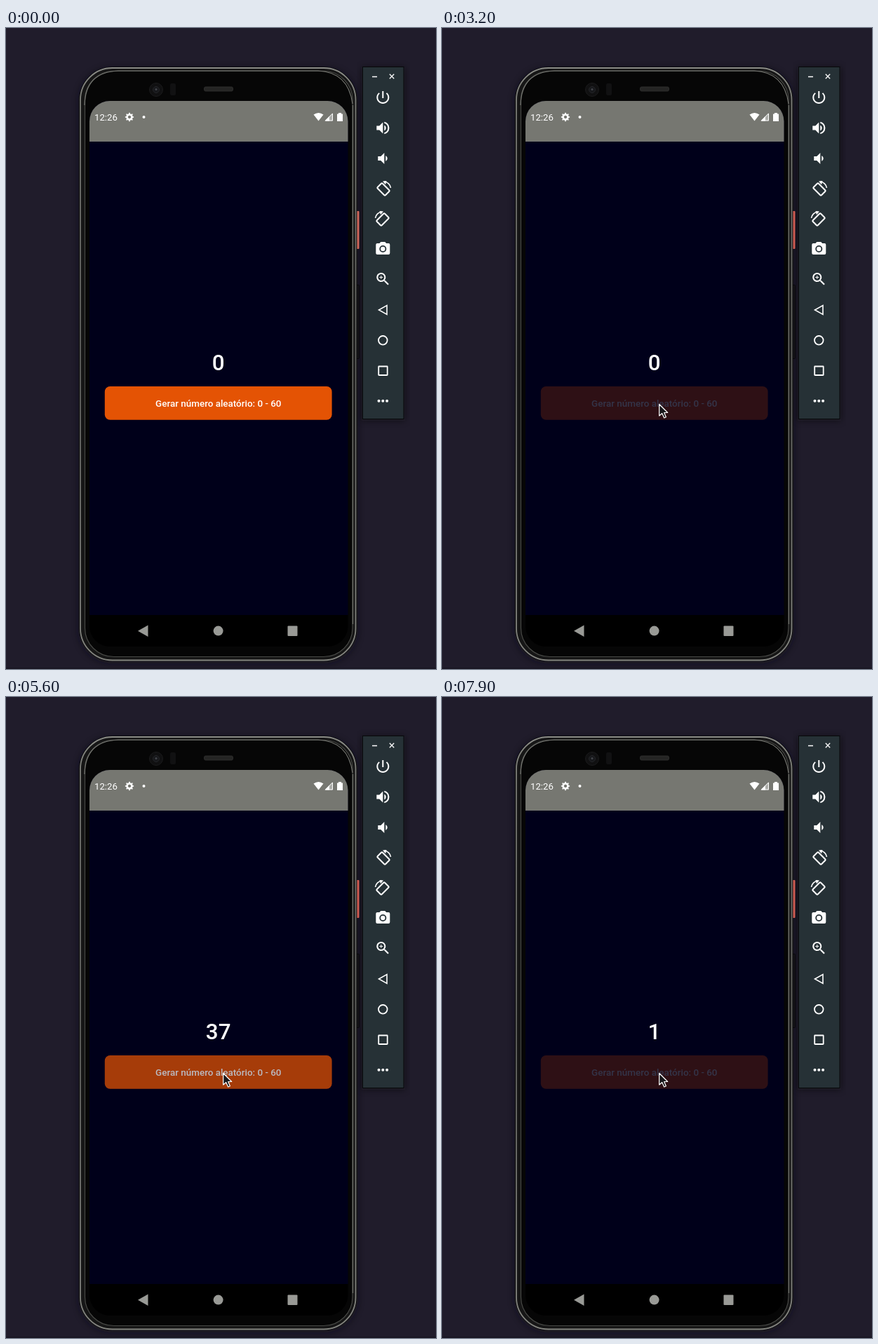
Recreate the animation shown at these times as an HTML page. Size 613 by 914 pixels, loop 8 s.

```html
<!DOCTYPE html>
<html lang="pt">
<head>
<meta charset="utf-8">
<title>Número aleatório</title>
<style>
  html, body { margin: 0; width: 100%; height: 100%; overflow: hidden; background: #201c2b; }
  svg { display: block; width: 613px; height: 914px; }
  text { font-family: Roboto, sans-serif; fill: #fff; }
  .mid { text-anchor: middle; font-weight: 500; }
  .line { fill: none; stroke: #fff; stroke-width: 1.8; }
</style>
</head>
<body>
<svg viewBox="0 0 613 914">
  <defs>
    <linearGradient id="rim" x1="0" y1="0" x2="0" y2="1">
      <stop offset="0" stop-color="#8b8c88"/>
      <stop offset=".08" stop-color="#777873"/>
      <stop offset=".5" stop-color="#5f605d"/>
      <stop offset="1" stop-color="#858681"/>
    </linearGradient>
    <filter id="soft" x="-10%" y="-10%" width="120%" height="120%"><feGaussianBlur stdDeviation="5"/></filter>
    <clipPath id="screen"><rect x="119" y="104" width="368.5" height="778" rx="29"/></clipPath>
    <g id="rotate">
      <rect x="-5" y="-8" width="10" height="16" rx="1.3" transform="translate(0 1) rotate(-45)" class="line" style="stroke-width:2"/>
      <path d="M1 -10A10.5 10.5 0 0 1 10.5 -1" class="line" style="stroke-width:1.6"/>
      <path d="M-1 -10.5L4.5 -11L3 -5.8Z" fill="#fff"/>
    </g>
  </defs>
  <rect width="613" height="914" fill="#201c2b"/>
  <rect y="912" width="613" height="2" fill="#191623"/>

  <!-- phone body -->
  <rect x="103" y="57" width="399" height="849" rx="48" fill="#0d0b13" opacity=".55" filter="url(#soft)"/>
  <rect x="499" y="366.500" width="4.500" height="105" rx="1" fill="#17161b" stroke="#0a090d"/>
  <rect id="power" x="499.500" y="261" width="4" height="54" rx="1" fill="#df7063"/>
  <rect x="104.500" y="55.500" width="395.500" height="847" rx="47" fill="#121212" stroke="#0b0b0c"/>
  <rect x="106" y="57" width="392.500" height="844.500" rx="45.500" fill="#161616" stroke="url(#rim)" stroke-width="1.800"/>
  <rect x="112.500" y="61.500" width="381.500" height="835" rx="41" fill="#060606" stroke="#484946" stroke-width="1.200"/>
  <path d="M112 110Q113 63 160 61H445Q488 63 494 108" fill="none" stroke="#777873" stroke-width="1.200"/>
  <path d="M494.500 110V850" stroke="#6c6d69" stroke-width="1.300"/>
  <circle cx="214" cy="88" r="9.500" fill="#101011" stroke="#1b1b1c"/>
  <circle cx="214" cy="88" r="4.500" fill="#17181b" stroke="#242528"/>
  <circle cx="214" cy="87.500" r="1.500" fill="#42454b"/>
  <rect x="234" y="79" width="8" height="17" rx="2" fill="#111112"/>
  <rect x="282.500" y="84" width="41" height="6" rx="2" fill="#252524" stroke="#333331" stroke-width=".8"/>

  <!-- screen -->
  <g clip-path="url(#screen)">
    <rect x="119" y="104" width="369" height="733" fill="#00001a"/>
    <rect x="119" y="104" width="369" height="58" fill="#767771"/>
    <rect x="119" y="837" width="369" height="46" fill="#000"/>
  </g>
  <text x="126" y="132" font-size="13.2">12:26</text>
  <path id="gear" fill="#fff"/>
  <g fill="#fff">
    <circle cx="196.500" cy="127" r="2"/>
    <path d="M438.500 123.500Q445.500 118.500 452.500 123.500L445.500 132.500Z"/>
    <path d="M454.500 132.500L466 121V132.500Z" opacity=".4"/>
    <path d="M454.500 132.500L461 126V132.500Z"/>
    <path d="M465.500 122V132H455.500Z" fill="none" stroke="#fff"/>
    <path d="M472 122.500H474V121H478V122.500H480V133H472Z"/>
  </g>
  <g fill="#999a96">
    <path d="M188 859.800L202.500 851.500V868Z"/>
    <circle cx="302.600" cy="859.600" r="7"/>
    <rect x="401.500" y="852.500" width="14" height="14.500" rx="1"/>
  </g>

  <text id="number" class="mid" x="302.700" y="488" font-size="31.4">0</text>
  <g id="button">
    <rect x="140.800" y="511" width="323.800" height="47.800" rx="7.500" fill="#e45304"/>
    <text class="mid" x="302.800" y="540.300" font-size="13.45">Gerar número aleatório: 0 - 60</text>
  </g>

  <!-- side toolbar -->
  <rect x="507" y="56" width="62" height="504" fill="#0b0910" opacity=".5" filter="url(#soft)"/>
  <rect x="508.500" y="55.500" width="58.500" height="502" fill="#263136" stroke="#07090a"/>
  <path d="M522 69.500H529M546.800 65.800L553.200 72.200M553.200 65.800L546.800 72.200" class="line" style="stroke-width:1.3"/>
  <g id="icons" fill="#fff"></g>
  <use href="#rotate" x="538" y="229"/>
  <use href="#rotate" transform="translate(537 272) scale(-1 1)"/>
  <path d="M543 395.500V408.500L531.500 402Z" class="line" style="stroke-width:1.6"/>
  <circle cx="537.300" cy="445.300" r="6.300" class="line"/>
  <rect x="531.200" y="482.500" width="12.500" height="12.500" rx=".5" class="line"/>
  <g fill="#fff">
    <circle cx="531.500" cy="531.700" r="2"/><circle cx="537.300" cy="531.700" r="2"/><circle cx="543.100" cy="531.700" r="2"/>
  </g>

  <path id="cursor" d="M0 0V16.500L4 13L7 19.500L9.700 18.300L7 12H12Z" fill="#17171a" stroke="#fff" stroke-width="1.200" stroke-linejoin="round"/>
</svg>
<script>
const el = id => document.getElementById(id);
const LOOP = 8000, STEP = 100;

// Toolbar glyphs on a 24-unit grid, by vertical centre
const glyphs = {
  99: 'M13 3h-2v10h2V3zm4.830 2.170l-1.420 1.420C17.990 7.860 19 9.810 19 12c0 3.870-3.130 7-7 7s-7-3.130-7-7c0-2.190 1.010-4.140 2.580-5.420L6.170 5.170C4.230 6.820 3 9.260 3 12c0 4.970 4.030 9 9 9s9-4.030 9-9c0-2.740-1.230-5.180-3.170-6.830z',
  142.5: 'M3 9v6h4l5 5V4L7 9H3zM14 8A4.500 4.500 0 0 1 14 16ZM14 3.200V5.300A7 7 0 0 1 14 18.700V20.800A9 9 0 0 0 14 3.200Z',
  186: 'M5 9v6h4l5 5V4L9 9H5zM16 8A4.500 4.500 0 0 1 16 16Z',
  315: 'M9 2L7.200 4H4a2 2 0 0 0-2 2V18a2 2 0 0 0 2 2H20a2 2 0 0 0 2-2V6a2 2 0 0 0-2-2H16.800L15 2ZM12 17A5 5 0 1 1 12 7A5 5 0 0 1 12 17ZM12 8.800A3.200 3.200 0 1 0 12 15.200A3.200 3.200 0 0 0 12 8.800Z',
  358: 'M15.500 14h-.8l-.3-.3A6.500 6.500 0 1 0 13.700 14.400l.3.3v.8l5 5L20.500 19ZM9.500 14A4.500 4.500 0 1 1 9.500 5A4.500 4.500 0 0 1 9.500 14ZM9 7h1V9h2v1H10v2H9V10H7V9H9Z'
};
el('icons').innerHTML = Object.entries(glyphs).map(([y, d]) =>
  `<path fill-rule="evenodd" d="${d}" transform="translate(525.3 ${y - 12})"/>`).join('');

// Settings gear: eight teeth around a hole
const teeth = Array.from({ length: 32 }, (_, i) => {
  const a = (i - .5) * Math.PI / 16, r = i % 4 < 2 ? 6.2 : 4.6;
  return `${(176 + r * Math.sin(a)).toFixed(2)} ${(127 - r * Math.cos(a)).toFixed(2)}`;
});
el('gear').setAttribute('d', `M${teeth.join('L')}ZM176 124.800a2.200 2.200 0 1 0 .01 0Z`);
el('gear').setAttribute('fill-rule', 'evenodd');

// Pointer positions, one per step from the moment it enters
const ENTER = 600;
const trail = [[158, 11], [214, 76], [276, 152], [336, 236], [390, 320], [432, 392], [456, 444], [463, 470],
  [456, 501], [432, 526], [394, 543], [357, 548], [331, 545], [316, 540], [311, 537]];
function pointer(t) {
  if (t >= 2500) return [309.7, 536.5];
  return trail[Math.min((t - ENTER) / STEP, trail.length - 1)];
}

// Each press dims the button, then its release brings a new number
const IDLE = .2, FADE = 250;
const presses = [
  { down: 3200, up: 3453, number: 25 },
  { down: 4400, up: 4553, number: 31 },
  { down: 5300, up: 5453, number: 37 },
  { down: 6200, up: 6253, number: 44 },
  { down: 7100, up: 7153, number: 1 },
  { down: 7900, up: LOOP + FADE }
];
const easeInOut = u => u < .5 ? 2 * u * u : 1 - 2 * (1 - u) ** 2;
function opacity(t) {
  const press = presses.findLast(p => p.down <= t);
  if (!press) return 1;
  const u = Math.min(Math.max((t - press.up) / FADE, 0), 1);
  return IDLE + (1 - IDLE) * easeInOut(u);
}
function number(t) {
  const done = presses.findLast(p => p.up - 53 <= t);
  return done ? done.number : 0;
}

function draw(now) {
  const t = Math.floor(now % LOOP / STEP) * STEP;
  const shown = t >= ENTER;
  el('cursor').setAttribute('visibility', shown ? 'visible' : 'hidden');
  if (shown) el('cursor').setAttribute('transform', `translate(${pointer(t)})`);
  el('button').setAttribute('opacity', opacity(t));
  el('number').textContent = number(t);
  el('power').setAttribute('fill', t < 3200 ? '#df7063' : '#e06459');
}

let start;
function tick(now) {
  start ??= now;
  draw(now - start);
  requestAnimationFrame(tick);
}
draw(0);
requestAnimationFrame(tick);
</script>
</body>
</html>
```
